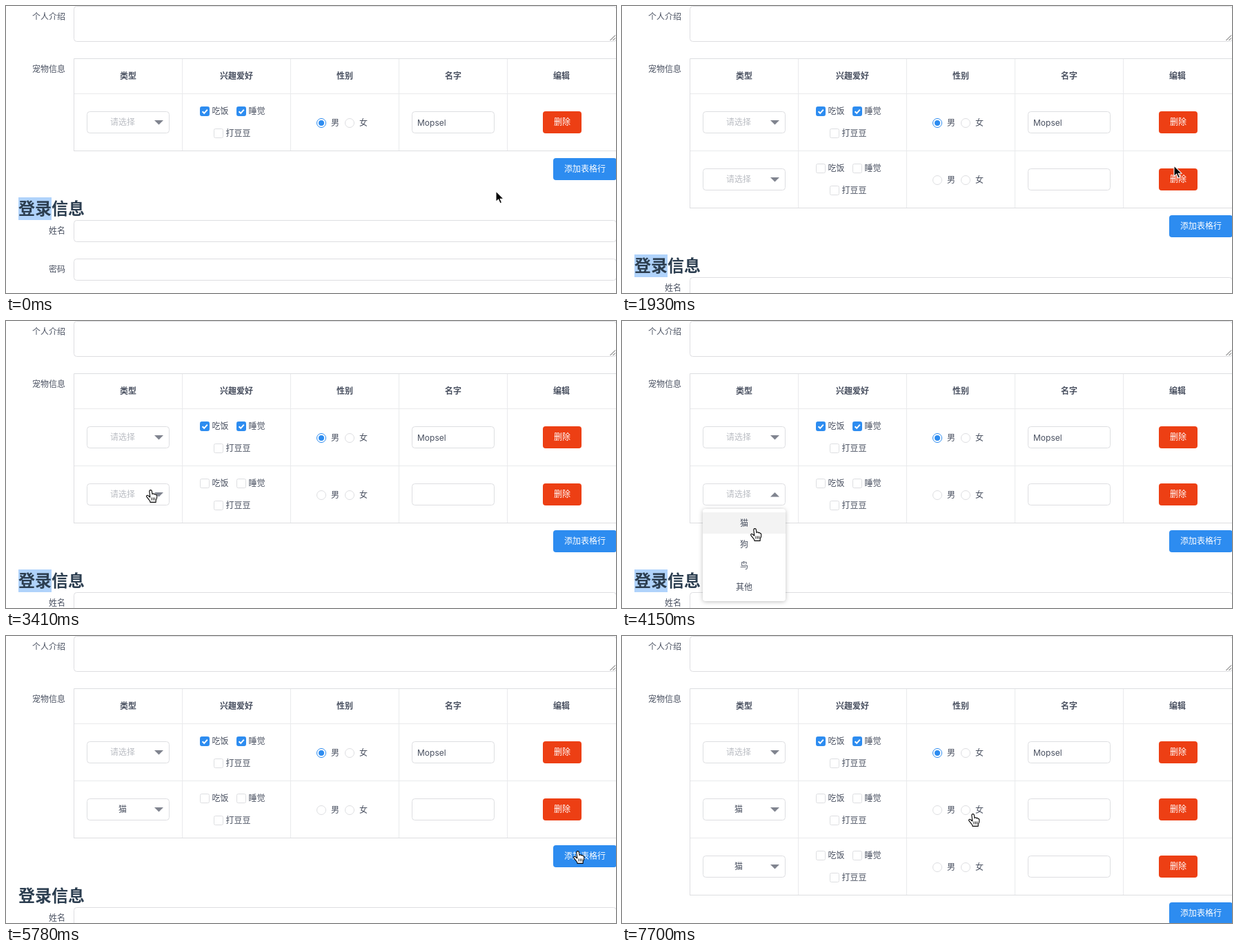
These frames come from a looping animation (884 by 417 pixels, 8000 ms). An HTML page:

```html
<!DOCTYPE html>
<html lang="zh-CN">
<head>
<meta charset="utf-8">
<title>表单</title>
<style>
html, body { margin: 0; width: 100%; height: 100%; overflow: hidden; background: #fff; }
svg { display: block; width: 884px; height: 417px; }
text { font: 12px Inter, "Noto Sans CJK SC", "Noto Sans CJK", sans-serif; fill: #495060; }
.box { fill: #fff; stroke: #dddee1; }
.line { fill: none; stroke: #e9eaec; }
.edge { fill: none; stroke: #dddee1; }
.on { fill: #2d8cf0; stroke: #2d8cf0; }
.ring { fill: #fff; stroke: #2d8cf0; }
.head { font-weight: 700; }
.hint { fill: #bbbec4; }
.light { fill: #fff; }
.title { font-size: 24px; font-weight: 700; fill: #2c3e50; }
#panel { filter: drop-shadow(0 1px 3px rgba(0, 0, 0, .25)); }
</style>
</head>
<body>
<svg id="stage" viewBox="0 0 884 417" xmlns="http://www.w3.org/2000/svg"></svg>
<script>
const LOOP = 8000, ROW = 83;
const ADD = 1630, OPEN = 3630, CLOSE = 4353, PICK = 4440, ADD2 = 6070;
const $ = id => document.getElementById(id);

// y is the vertical centre of the glyphs
const text = (s, x, y, cls = '', anchor = 'start', dy = 4.4) =>
  `<text x="${x}" y="${y + dy}" class="${cls}" text-anchor="${anchor}">${s}</text>`;
const box = (x, y, w, h, r = 4, cls = 'box') =>
  `<rect x="${x + .5}" y="${y + .5}" width="${w - 1}" height="${h - 1}" rx="${r}" class="${cls}"/>`;
const button = (s, x, y, w, fill) =>
  `<rect x="${x}" y="${y}" width="${w}" height="32" rx="4" fill="${fill}"/>` +
  text(s, x + w / 2, y + 16, 'light', 'middle');
const path = (d, cls) => `<path d="${d}" class="${cls}"/>`;

function check(s, x, y, on) {
  const tick = on ? `<path d="M${x + 3.6} ${y + 7.2}l2.6 2.6 4.6-5.2" fill="none" stroke="#fff" stroke-width="2"/>` : '';
  return box(x, y, 14, 14, 2, on ? 'on' : 'box') + tick + text(s, x + 17.5, y + 7);
}

function radio(s, x, on) {
  const dot = on ? `<circle cx="${x}" cy="170" r="4" fill="#2d8cf0"/>` : '';
  return `<circle cx="${x}" cy="170" r="6.5" class="${on ? 'ring' : 'box'}"/>` + dot + text(s, x + 14, 170);
}

function row(i, filled, name) {
  return `<g id="row${i}" transform="translate(0 ${i * ROW})">` +
    path('M99 127.5H884M255.5 127V210M412.5 127V210M569.5 127V210M726.5 127V210', 'line') +
    path('M98.5 127V210', 'edge') +
    box(117, 153, 120, 32) +
    `<g id="hint${i}">${text('请选择', 169, 169, 'hint', 'middle')}</g>` +
    `<g id="pick${i}">${text('猫', 169, 169, '', 'middle')}</g>` +
    `<path id="caret${i}" d="M215 166h13l-6.5 6.5z" fill="#80848f"/>` +
    check('吃饭', 281, 146, filled) + check('睡觉', 334, 146, filled) + check('打豆豆', 301, 178, false) +
    radio('男', 457, filled) + radio('女', 498, false) +
    box(588, 153, 120, 32) + text(name, 596, 170) +
    button('删除', 778, 153, 56, '#ed3f14') + '</g>';
}

const heads = ['类型', '兴趣爱好', '性别', '名字', '编辑'];
const options = ['猫', '狗', '鸟', '其他'];

$('stage').innerHTML =
  '<rect width="884" height="417" fill="#fff"/>' +
  text('个人介绍', 86, 16, '', 'end') + box(98, 0, 787, 52) +
  '<path d="M875.5 50L883 42.5M879.5 50L883 46.5" stroke="#555" fill="none"/>' +
  text('宠物信息', 86, 92, '', 'end') +
  path('M884 76.5H98.5V127', 'edge') +
  path('M255.5 77V127M412.5 77V127M569.5 77V127M726.5 77V127', 'line') +
  heads.map((s, i) => text(s, 177 + i * 157, 102, 'head', 'middle')).join('') +
  row(0, true, 'Mopsel') + row(1, false, '') + row(2, false, '') +
  '<g id="below">' + path('M98 210.5H884', 'edge') +
  button('添加表格行', 793, 221, 92, '#2d8cf0') +
  '<rect id="mark" x="18" y="278" width="48" height="33" fill="#b0d3fb"/>' +
  text('登录信息', 18, 294, 'title', 'start', 8.6) +
  text('姓名', 86, 327, '', 'end') + box(98, 311, 787, 32) +
  text('密码', 86, 383, '', 'end') + box(98, 367, 787, 32) + '</g>' +
  '<g id="menu"><rect id="panel" x="117" y="273" width="120" height="134" rx="4" fill="#fff"/>' +
  '<rect id="hover" x="117" y="278" width="120" height="31"/>' +
  options.map((s, i) => text(s, 177, 294 + i * 31, '', 'middle')).join('') + '</g>' +
  '<g id="arrow"><path d="M0 0V15.4L3.6 12.1 6 17.8 8.6 16.7 6.2 11.2H11Z" fill="#000" stroke="#fff" stroke-width="1.1"/></g>' +
  '<g id="hand"><path d="M-2.2 1.2C-2-.8 1-1 1.3 1L2 5.6C2.6 4.4 4.6 4.6 4.8 6 5.5 5 7.2 5.4 7.2 6.8 8 6.3 9 6.9 8.8 8.2 9 11 8.4 12.5 7.3 14.2L7.1 17.4H-1L-1.4 15.5C-3 13.4-4.5 11.5-6 9.6-7.2 7.6-5 6.4-3.6 8L-1.2 10Z" fill="#fff" stroke="#000" stroke-width="1.1" stroke-linejoin="round"/>' +
  '<path d="M1 10.5V14.5M3.4 10.5V14.5M5.7 10.5V14.5" stroke="#000" stroke-width=".9"/></g>';

// start, end, then pointer places at even steps; * marks the hand
const moves = [
  [0, 0, '710,269'],
  [300, 450, '765,256 808,235*'],
  [750, 1340, '812,217 822,198 828,204 830,224* 823,241*'],
  [ADD, ADD, '824,241'],
  [1930, 2960, '800,232 742,214 660,198 570,190 484,188 407,194 280,226 191,252*'],
  [3260, 3410, '203,250* 210,246*'],
  [3700, 4150, '210,246* 208,256* 200,283* 193,302*'],
  [PICK, 4730, '194,302* 211,299* 520,288'],
  [5030, 5780, '560,291 640,297 720,304 784,309 818,312* 829,313*'],
  [ADD2, 6370, '829,313 748,317 608,309'],
  [6670, 7700, '600,307 588,303 572,297 556,290 541,282 527,273 516,265 509,259*']
];

const poses = moves.flatMap(([from, to, list]) => list.split(' ').map((p, i, all) => {
  const [x, y] = p.split(',').map(parseFloat);
  const t = from + (to - from) * i / Math.max(1, all.length - 1);
  return { t: Math.floor(t / 10) * 10, x, y, hand: p.endsWith('*') };
}));

const show = (id, on) => $(id).setAttribute('visibility', on ? 'visible' : 'hidden');
const set = (id, key, value) => $(id).setAttribute(key, value);
const smooth = (t, start, span) => {
  const p = Math.min(1, Math.max(0, (t - start) / span));
  return p * p * (3 - 2 * p);
};

function draw({ t, x, y, hand }) {
  const rows = 1 + (t >= ADD) + (t >= ADD2), picked = t >= PICK;
  for (let i = 0; i < 3; i++) {
    set('row' + i, 'display', i < rows ? 'inline' : 'none');
    set('hint' + i, 'display', i && picked ? 'none' : 'inline');
    set('pick' + i, 'display', i && picked ? 'inline' : 'none');
  }
  set('below', 'transform', `translate(0 ${(rows - 1) * ROW})`);
  show('mark', !picked);

  const shown = smooth(t, OPEN, 300) - (picked ? smooth(t, CLOSE, 300) : 0);
  const turn = 180 * (smooth(t, OPEN, 220) - (picked ? smooth(t, CLOSE, 220) : 0));
  set('caret1', 'transform', `rotate(${turn} 221.5 169.2)`);
  show('menu', shown > 0);
  set('menu', 'opacity', shown);
  set('menu', 'transform', `translate(0 272.5) scale(1 ${.8 + .2 * shown}) translate(0 -272.5)`);
  set('hover', 'fill', picked ? 'rgba(45,140,240,.9)' : y > 278 ? '#f3f3f3' : 'none');
  $('menu').querySelector('text').setAttribute('class', picked ? 'light' : '');

  show('arrow', !hand);
  show('hand', hand);
  set(hand ? 'hand' : 'arrow', 'transform', `translate(${x} ${y})`);
}

let last;
function tick() {
  const t = performance.now() % LOOP;
  const pose = poses.findLast(p => p.t <= t + 1);
  if (pose !== last) draw(last = pose);
  requestAnimationFrame(tick);
}
tick();
</script>
</body>
</html>
```
